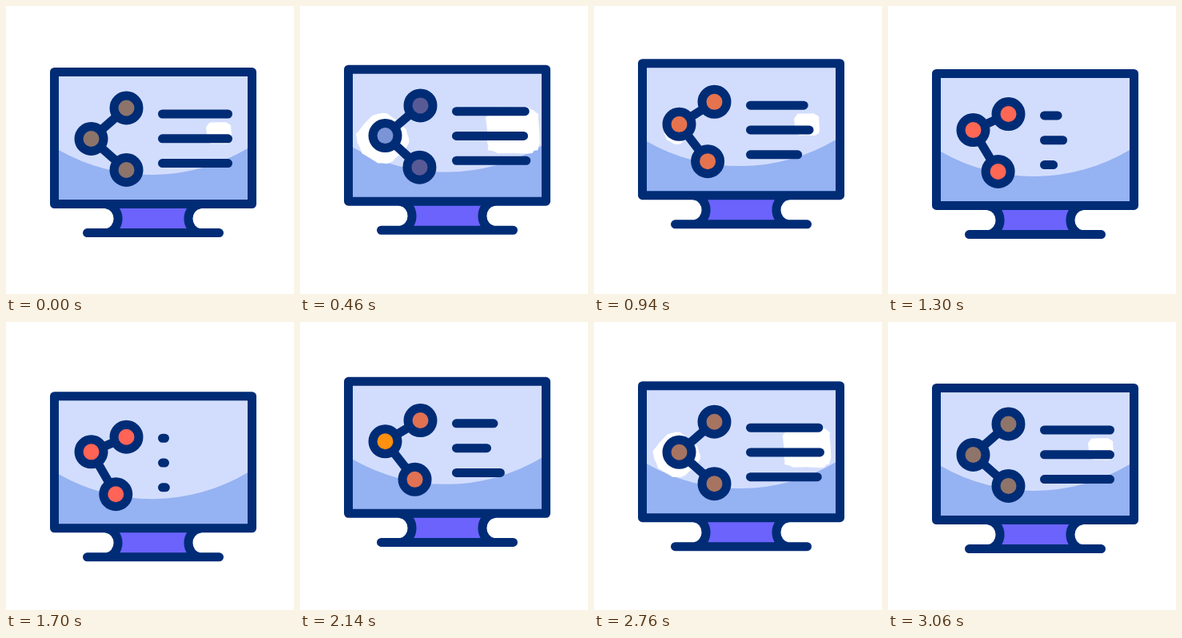
Animation, 360 px wide and 360 px high, one loop 3.22 s. Source, as an HTML page:

```html
<!DOCTYPE html>
<html lang="en">
<head>
<meta charset="utf-8">
<title>Sharing monitor</title>
<style>
  html, body { margin: 0; width: 100%; height: 100%; overflow: hidden; background: #fff; }
  svg { display: block; width: 100vw; height: 100vh; }
  .ink { stroke: #002c76; stroke-width: 11; stroke-linecap: round; stroke-linejoin: round; fill: none; }
</style>
</head>
<body>
<svg viewBox="0 0 360 360">
  <g id="monitor">
    <path d="M126 250H242A18 18 0 0 0 242 283.6H126A18 18 0 0 0 126 250Z" fill="#6b63fb"/>
    <path class="ink" d="M126 248A16.5 18 0 0 1 126 283.6M242 248A16.5 18 0 0 0 242 283.6M101.5 283.6H266.5"/>
    <rect x="60.5" y="82.5" width="247" height="165" fill="#95b2f2"/>
    <path d="M61 83H307V176L302 178A234 234 0 0 1 66 180L61 177Z" fill="#d2ddfd"/>
    <polygon id="glareLeft" fill="#fff"/>
    <polygon id="glareRight" fill="#fff"/>
    <rect class="ink" x="60.5" y="82.5" width="247" height="165"/>
    <path class="ink" id="lines"/>
    <path class="ink" id="links"/>
    <g id="nodes">
      <circle class="ink" r="15.5"/>
      <circle class="ink" r="15.5"/>
      <circle class="ink" r="15.5"/>
    </g>
  </g>
</svg>
<script>
const LOOP = 3220;
const BROWN = [140, 116, 106], ORANGE = [250, 118, 68], CORAL = [255, 98, 88];
const SLATE = [88, 90, 150], SKY = [122, 148, 214], AMBER = [255, 144, 16];

const $ = id => document.getElementById(id);
const nodes = [...$('nodes').children];
const clamp = u => Math.min(1, Math.max(0, u));
const mix = (a, b, u) => a.map((v, i) => v + (b[i] - v) * u);

// Eased step from 0 to 1 between two times.
const ramp = (t, from, to) => (1 - Math.cos(Math.PI * clamp((t - from) / (to - from)))) / 2;
const pulse = (t, peak, reach) => ramp(t, peak - reach, peak) - ramp(t, peak, peak + reach);

const bob = t => 11 * (2 * ramp(t, 900, 1620) - ramp(t, 200, 900)
  - 2 * ramp(t, 1620, 2300) + ramp(t, 2300, 3000));
const swing = t => ramp(t, 300, 1560) - ramp(t, 1560, 2890);
const slide = t => ramp(t, 245, 1435) - ramp(t, 1660, 2650);
const lineEnd = t => 277.5 + 7 * (ramp(t, 220, 580) - ramp(t, 2520, 2880))
  - 86 * (ramp(t, 580, 1480) - ramp(t, 1646, 2520));
const glareSize = t => 0.45 + 0.5 * (ramp(t, 220, 460) - ramp(t, 460, 940))
  - 0.45 * ramp(t, 940, 1060) + ramp(t, 2320, 2420) - 0.55 * ramp(t, 2600, 3060);

function tint(t, isLeft) {
  const warmth = ramp(t, 380, 1200) - clamp((t - 1700) / 1400);
  let color = mix(mix(BROWN, ORANGE, warmth), CORAL, swing(t) ** 3);
  color = mix(color, isLeft ? SKY : SLATE, pulse(t, 460, 240));
  if (isLeft) color = mix(color, AMBER, pulse(t, 2140, 240));
  return `rgb(${color.map(Math.round)})`;
}

// Ragged rounded patch; a smaller power makes it squarer.
function patch(cx, cy, rx, ry, power) {
  const bend = v => Math.sign(v) * Math.abs(v) ** power;
  return Array.from({ length: 28 }, (_, i) => {
    const angle = i / 28 * 2 * Math.PI;
    const rough = 1 + 0.04 * Math.sin(i * i * 2.3);
    return [cx + rx * rough * bend(Math.cos(angle)), cy + ry * rough * bend(Math.sin(angle))];
  }).join(' ');
}

function render(t) {
  $('monitor').setAttribute('transform', `translate(0 ${bob(t)})`);

  const q = swing(t);
  const spots = [[150.5, 127.5 + 6.2 * q], [106.5, 166 - 14.3 * q], [150.5 - 13.3 * slide(t), 205]];
  $('links').setAttribute('d', 'M' + spots.join('L'));
  nodes.forEach((node, i) => {
    node.setAttribute('cx', spots[i][0]);
    node.setAttribute('cy', spots[i][1]);
    node.style.fill = tint(t, i === 1);
  });

  // The bottom line leads, then the top, then the middle.
  const lines = [1, 2, 0].map((order, row) =>
    `M195.5 ${135 + 30.8 * row}H${lineEnd(t - 55 * order)}`);
  $('lines').setAttribute('d', lines.join(''));

  const size = glareSize(t);
  $('glareLeft').setAttribute('points', patch(103, 169, 35 * size, 33 * size, 1.2));
  $('glareRight').setAttribute('points', patch(266, 159, 35 * size, 30 * size, 0.4));
}

const start = performance.now();
function tick() {
  render((performance.now() - start) % LOOP);
  requestAnimationFrame(tick);
}
tick();
</script>
</body>
</html>
```
